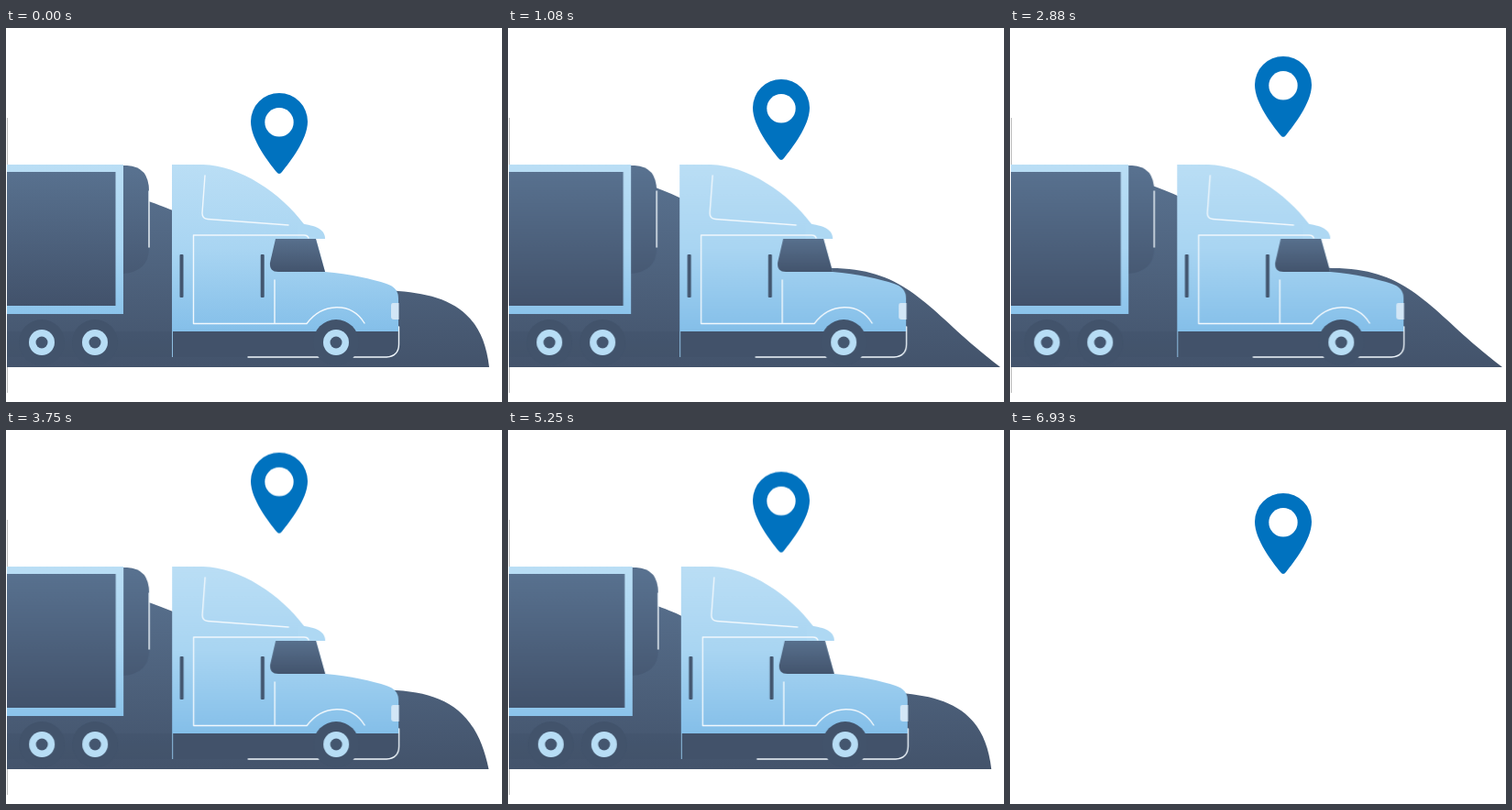
Write an HTML page that moves like this. It is 541 by 408 pixels and loops after 6.96 s.

```html
<!DOCTYPE html>
<html lang="en">
<head>
<meta charset="utf-8">
<title>Truck and location pin</title>
<style>
  html, body { margin: 0; width: 100%; height: 100%; overflow: hidden; background: #fff; }
  svg { display: block; width: 541px; height: 408px; }

  .scene { animation: blink 6960ms step-end infinite; }
  .hill  { animation: roll 1740ms linear infinite; }
  .truck { animation: drive 1740ms cubic-bezier(.65, 0, .35, 1) infinite alternate; }
  .pin   { animation: float 6960ms linear infinite; }

  @keyframes blink {
    0% { visibility: visible; }
    99.55%, 100% { visibility: hidden; }
  }
  @keyframes drive {
    from { transform: translateX(0); }
    to { transform: translateX(7.8px); }
  }
  @keyframes float {
    0% { transform: translateY(0); }
    50.86% { transform: translateY(-49.3px); }
    100% { transform: translateY(-1.6px); }
  }
  @keyframes roll {
    0%, 100% { d: path("M0 370 L0 312 L110 312 L110 175 C135 181 165 192 182 199 C250 232 330 278 428 287 C480 291 520 307 527 370 Z"); }
    8.6% { d: path("M0 370 L0 312 L110 312 L110 175 C135 181 165 193 189 204 C250 232 330 278 428 287 C482 291 521 307 528 370 Z"); }
    41.4% { d: path("M0 370 L0 312 L110 312 L110 175 C135 177 165 183 187 188 C250 205 300 262 380 270 C455 266 482 290 521 370 Z"); }
    60%, 66% { d: path("M0 370 L0 312 L110 312 L110 160 C135 165 165 174 187 185 C250 210 300 262 352 262 C440 262 460 312 537 370 Z"); }
  }

  .line { fill: none; stroke: #f1f8fd; stroke-width: 1.4; stroke-linecap: round; stroke-linejoin: round; }
  .handle { fill: #43566f; }
</style>
</head>
<body>
<svg viewBox="0 0 541 408">
  <defs>
    <linearGradient id="dark" gradientUnits="userSpaceOnUse" x1="0" y1="150" x2="0" y2="370">
      <stop offset="0" stop-color="#5a7391"/>
      <stop offset="1" stop-color="#43536b"/>
    </linearGradient>
    <linearGradient id="box" gradientUnits="userSpaceOnUse" x1="0" y1="157" x2="0" y2="303">
      <stop offset="0" stop-color="#58718f"/>
      <stop offset="1" stop-color="#42526b"/>
    </linearGradient>
    <linearGradient id="glass" x1="0" y1="0" x2="0" y2="1">
      <stop offset="0" stop-color="#58708d"/>
      <stop offset="1" stop-color="#43546d"/>
    </linearGradient>
    <linearGradient id="light" gradientUnits="userSpaceOnUse" x1="0" y1="149" x2="0" y2="331">
      <stop offset="0" stop-color="#badef5"/>
      <stop offset=".5" stop-color="#a9d5f2"/>
      <stop offset="1" stop-color="#84bfe9"/>
    </linearGradient>
    <clipPath id="stage"><rect x="1" width="540" height="408"/></clipPath>
    <g id="wheel">
      <circle r="25" fill="#42536b"/>
      <circle r="14" fill="#b7ddf5"/>
      <circle r="6.5" fill="#44566f"/>
    </g>
  </defs>

  <g class="scene" clip-path="url(#stage)">
    <rect x="1" y="98" width="1" height="300" fill="#bdbdbd"/>
    <path class="hill" fill="url(#dark)" d="M0 370 L0 312 L110 312 L110 175 C135 181 165 192 182 199 C250 232 330 278 428 287 C480 291 520 307 527 370 Z"/>

    <g class="truck">
      <!-- trailer and cooling unit -->
      <rect x="-20" y="331" width="201" height="28" fill="#3f4f67" opacity=".3"/>
      <path d="M127 150 H132 Q156 151 156 178 V240 Q156 266 127 268 Z" fill="url(#box)"/>
      <path class="line" d="M156 178 V239"/>
      <rect x="-20" y="149" width="148" height="163" fill="url(#light)"/>
      <rect x="-20" y="157" width="139.5" height="146" fill="url(#box)"/>

      <!-- bumper -->
      <path d="M181 330 H428.5 V345 Q428 359 415 359 H181 Z" fill="#42526a"/>
      <path d="M181.5 331 V359" stroke="#8fbfe2"/>
      <path class="line" d="M264 359 H415 Q428.500 358 428.500 345 V326"/>

      <!-- cab -->
      <path d="M181 149 H215 C255 150 300 180 325 214 L338 230 L348 266 C375 268 400 274 415 279 Q428 283 428 295 V331 H181 Z" fill="url(#light)"/>
      <path d="M318 213 C335 215 348 218 348 230 H318 Z" fill="#aed8f3"/>
      <path d="M294 230 H338 L348 266 H297 Q287 266 288 256 Z" fill="url(#glass)"/>
      <path d="M428.500 300 H422 Q420 300 420 303 V315 Q420 318 423 318 H428.500 Z" fill="#d2e6f6"/>
      <path class="line" d="M217 161 L214 202 Q214 208 220 208.500 L308 215"/>
      <path class="line" d="M330 229 Q329 226 325 226 H204.500 V322.500 H328 C345 300 376 298 391 322 M293 275 V322"/>
      <rect class="handle" x="189.500" y="247" width="4" height="47" rx="1"/>
      <rect class="handle" x="277.700" y="247" width="4" height="47" rx="1"/>

      <use href="#wheel" x="39" y="343"/>
      <use href="#wheel" x="97" y="343"/>
      <use href="#wheel" x="360" y="343"/>
    </g>
  </g>

  <g class="pin">
    <path d="M267 102 A31 31 0 0 1 329 102 C329 122 309 147 301 157 Q298 161 295 157 C287 147 267 122 267 102 Z" fill="#0072bf"/>
    <circle cx="298" cy="102.800" r="15.700" fill="#fff"/>
  </g>
</svg>
</body>
</html>
```
